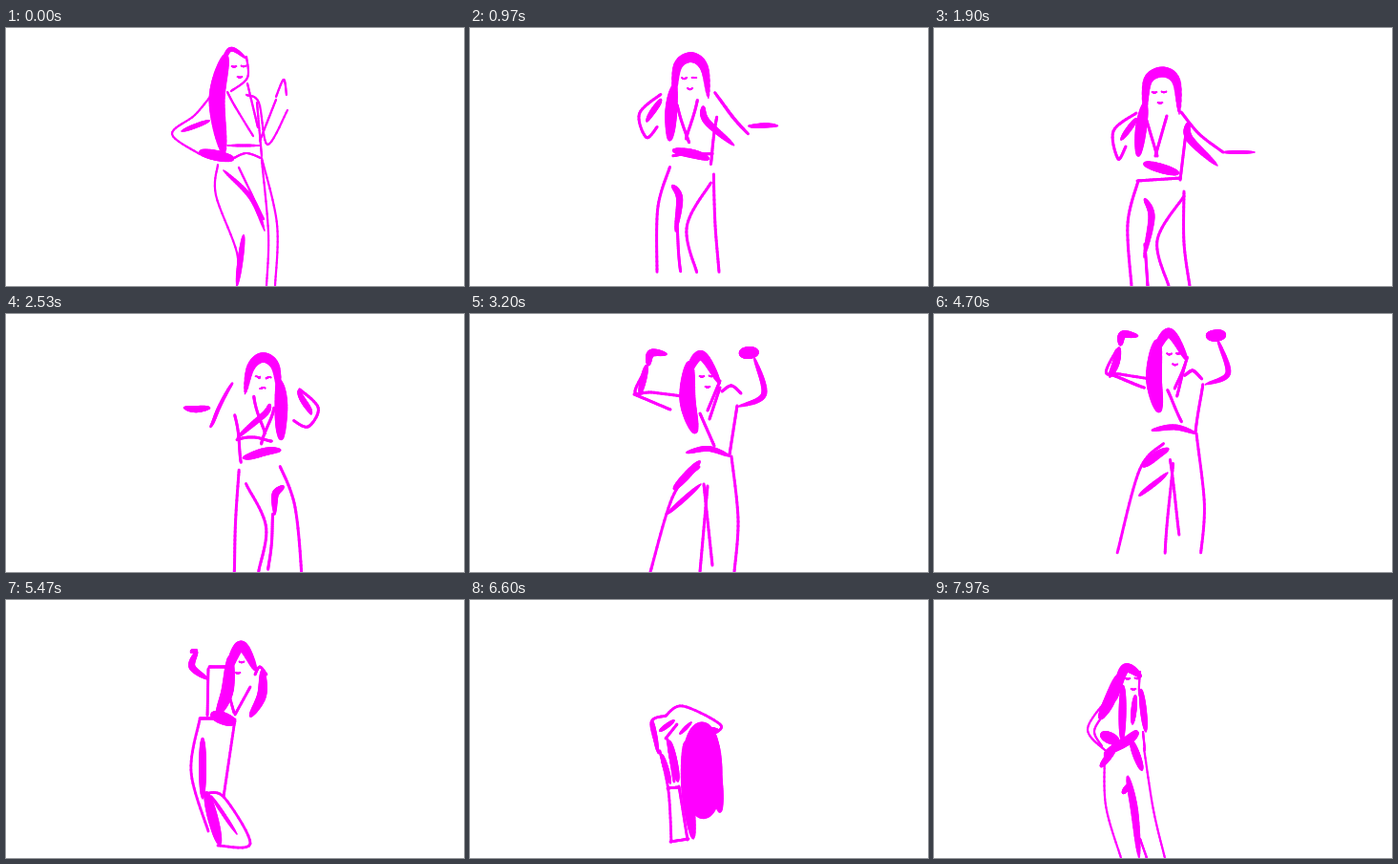
Recreate the animation shown at these times as an HTML page with a canvas. Size 480 by 270 pixels, loop 8000 ms.

```html
<!DOCTYPE html>
<html lang="en">
<head>
<meta charset="utf-8">
<title>Dancer</title>
<style>
  html, body { margin: 0; width: 100%; height: 100%; overflow: hidden; background: #fff; }
  canvas { display: block; width: 100vw; height: 100vh; }
</style>
</head>
<body>
<canvas id="stage" width="480" height="270"></canvas>
<script>
const LOOP = 8000, FPS = 30, SAMPLES = 28;

// A part is a brush stroke through a few x y points.
// An extra last number is the width of its belly; without it the line is even.
const hip = {
  line: 2.2, look: '243 40',
  crown: '222 55 234 23 252 32 5', lock: '230 30 221 75 228 131 17', cheek: '252 30 253 52 236 66',
  armL: '217 68 198 91 174 111 203 132', sleeve: '213 97 184 108 5', handL: '204 130 238 137 11',
  armR: '252 70 265 78 274 122 295 86', cuff: '283 75 266 118', handR: '283 72 291 54 294 70',
  lapelL: '232 67 240 82 259 113', lapelR: '253 58 264 104', side: '263 78 268 134',
  waist: '232 123 267 123 3', belt: '239 136 252 131 267 136',
  legL: '222 143 220 175 242 235 242 270', legM: '268 138 275 215 273 270', legR: '268 136 284 205 282 270',
  foldA: '228 149 257 178 271 212 5', foldB: '249 217 242 270 6', crease: '244 146 270 200'
};
const point = {
  line: 3, look: '235 67',
  crown: '221 88 224 55 240 46 254 56 257 90 11', lock: '221 80 217 105 214 134 12',
  armL: '212 89 188 108 193 137 201 124', sleeve: '212 95 196 117 6',
  armR: '259 88 278 111 303 130', cuff: '266 100 268 116 297 144 8', handR: '303 130 336 130 4',
  lapelL: '222 94 234 134', lapelR: '244 92 232 134', side: '264 110 258 159',
  waist: '221 142 256 152 10', belt: '213 160 258 157',
  legL: '214 160 203 205 207 270', legM: '262 176 234 222 246 270', legR: '262 171 262 225 268 270',
  foldA: '221 179 228 198 220 240 7', crease: '221 226 224 270'
};
const raise = {
  line: 3, look: '247 65',
  crown: '226 66 242 43 262 73 10', lock: '230 52 228 90 236 124 17', cheek: '262 70 249 101',
  armL: '184 58 173 82 190 82 222 86', sleeve: '185 54 178 84 7', handL: '187 53 190 41 206 42 8',
  armR: '298 46 308 84 281 97 6', handR: '285 41 300 40 13', cuff: '172 84 210 100',
  lapelL: '241 104 256 138', lapelR: '262 77 251 110', side: '280 96 272 147',
  waist: '227 145 250 141 273 149 6', belt: '264 81 274 75 284 83',
  legL: '240 160 213 190 189 270', legM: '249 180 241 270', legR: '274 149 281 215 277 270',
  foldA: '214 183 241 154 8', foldB: '207 209 242 178 5', crease: '245 178 254 263'
};
const stride = {
  line: 2.4, look: '231 27',
  crown: '214 35 232 7 247 24 10', lock: '217 22 204 60 179 102 15', cheek: '248 18 246 42 234 68',
  armL: '210 52 196 82 192 102', sleeve: '230 70 222 98 193 104 15', handL: '221 43 231 49 9',
  armR: '242 60 268 63', cuff: '244 70 268 68 5', handR: '265 58 286 62 6',
  lapelL: '226 55 238 78', lapelR: '222 40 233 22 239 69', side: '245 68 240 106',
  waist: '192 111 243 110 6', belt: '195 113 196 132 7',
  legL: '194 115 179 116 179 160 170 270', legM: '213 139 197 248 201 270', legR: '233 111 253 230 252 270',
  foldA: '219 136 217 180 239 226 13', foldB: '240 222 219 265 8', crease: '220 115 234 133'
};
const shimmy = {
  line: 2.8, look: '241 65',
  crown: '231 78 246 48 262 74 11', lock: '235 60 232 95 222 120 13',
  armL: '200 54 195 70 212 83 7', handL: '194 54 200 53 5', cuff: '213 70 230 70',
  armR: '269 74 268 100 256 122 10', handR: '261 78 266 70 273 78',
  lapelL: '232 93 239 118', lapelR: '256 91 240 120', side: '212 72 211 121',
  waist: '217 120 239 128 13', belt: '203 124 219 124',
  legL: '203 125 194 180 212 242', legM: '211 202 229 207 256 255 222 257', legR: '240 125 228 206',
  foldA: '206 145 206 208 8', foldB: '210 202 224 256 11', crease: '215 205 242 245 4'
};
const bow = {
  line: 2.8,
  crown: '226 150 228 200 234 250 13', lock: '243 136 243 180 245 223 43',
  armL: '206 121 190 128 198 160', sleeve: '191 126 197 160 5', handL: '199 137 214 126 5',
  armR: '205 121 223 111 262 130 256 140', handR: '246 135 260 136 5',
  lapelL: '205 145 217 130', lapelR: '220 140 232 128 4', side: '207 146 214 190',
  waist: '209 148 218 190 8', belt: '207 197 218 196',
  legL: '199 158 208 200 211 253', legM: '219 195 228 251', legR: '210 253 229 250',
  foldA: '201 162 210 192 6', foldB: '256 160 262 222 12'
};
const walk = {
  line: 2.2, look: '207 82',
  crown: '189 105 200 72 217 80 10', lock: '193 80 184 105 174 124 12', cheek: '216 75 215 96 219 110',
  armL: '183 102 161 135 180 158', sleeve: '179 118 168 137 176 153', handL: '177 141 192 148 12',
  armR: '217 94 222 138 7', cuff: '175 174 190 155 7',
  lapelL: '198 90 197 148 8', lapelR: '211 100 208 130 6', side: '219 138 221 157',
  waist: '180 160 203 147 213 138 10', belt: '207 148 218 178 8',
  legL: '179 160 180 215 196 270', legR: '220 155 230 220 242 270',
  foldA: '203 185 210 220 215 270 8', foldB: '205 193 198 202 6', crease: '216 250 223 270'
};

const at = (time, pose, dx = 0, dy = 0, mirrored = false) => ({ time, pose, dx, dy, mirrored });
const keys = [
  at(0, hip), at(430, hip, -6, -3), at(870, point, -8, -14), at(1270, raise, -8, -18),
  at(1900, point), at(2270, point, 48, 0, true), at(2850, raise, 24, 0, true), at(3200, raise),
  at(3600, hip, -12, -14), at(4030, stride), at(4400, stride, 14), at(4770, raise, 4, -22),
  at(5130, shimmy, 4, -6, true), at(5470, shimmy), at(5970, shimmy, -12), at(6600, bow),
  at(7130, walk, 8, -38), at(7970, walk)
];

const mix = (a, b, u) => a + (b - a) * u;
const spline = (a, b, c, d, u) =>
  b + u / 2 * (c - a + u * (2 * a - 5 * b + 4 * c - d + u * (3 * (b - c) + d - a)));

function brush(text, line) {
  const n = text.split(' ').map(Number);
  const belly = n.length % 2 ? n.pop() : 0;
  const last = n.length / 2 - 1;
  const coord = (i, axis) => n[2 * Math.max(0, Math.min(last, i)) + axis];
  return Array.from({ length: SAMPLES }, (_, s) => {
    const along = s / (SAMPLES - 1);
    const i = Math.min(last - 1, Math.floor(along * last));
    const [x, y] = [0, 1].map(axis =>
      spline(...[-1, 0, 1, 2].map(k => coord(i + k, axis)), along * last - i));
    const width = belly ? Math.max(1.6, belly * Math.sqrt(Math.sin(Math.PI * along))) : line;
    return { x, y, width };
  });
}

function addFeatures(pose) {
  if (!pose.look) return;
  const [x, y] = pose.look.split(' ').map(Number);
  const dash = (dx, dy) => `${x + dx - 2.5} ${y + dy} ${x + dx} ${y + dy + 0.7} ${x + dx + 2.5} ${y + dy} 2`;
  pose.eyeL = dash(-4, 0);
  pose.eyeR = dash(6, -0.5);
  pose.mouth = dash(2, 11);
  delete pose.look;
}

const poses = [...new Set(keys.map(key => key.pose))];
poses.forEach(addFeatures);
const names = [...new Set(poses.flatMap(Object.keys))].filter(name => name !== 'line');
for (const pose of poses) {
  for (const name of names) if (pose[name]) pose[name] = brush(pose[name], pose.line);
}

const ctx = document.getElementById('stage').getContext('2d');
const placeX = (key, x) => (key.mirrored ? 470 - x : x) + key.dx;

function drawPart(name, seed, from, to, u, frame) {
  const a = from.pose[name], b = to.pose[name];
  if (!(u < 0.5 ? a : b)) return;
  const wobble = 0.8 * Math.sin(Math.PI * u);
  let before;
  for (let s = 0; s < SAMPLES; s++) {
    const p = (a || b)[s], q = (b || a)[s];
    const phase = s / SAMPLES * 2 * Math.PI + seed * 3 + frame * 2.4;
    const x = mix(placeX(from, p.x), placeX(to, q.x), u) + wobble * Math.sin(phase);
    const y = mix(p.y + from.dy, q.y + to.dy, u) + wobble * Math.cos(phase);
    if (before) {
      ctx.lineWidth = mix(p.width, q.width, u);
      ctx.beginPath();
      ctx.moveTo(before.x, before.y);
      ctx.lineTo(x, y);
      ctx.stroke();
    }
    before = { x, y };
  }
}

function draw(now) {
  const frame = Math.floor(now % LOOP * FPS / 1000 + 0.01);
  const time = frame * 1000 / FPS;
  const next = Math.max(1, keys.findIndex(key => key.time > time));
  const from = keys[next - 1], to = keys[next];
  const linear = (time - from.time) / (to.time - from.time);
  const u = linear * linear * (3 - 2 * linear);
  ctx.fillStyle = '#fff';
  ctx.fillRect(0, 0, 480, 270);
  ctx.strokeStyle = '#f0f';
  ctx.lineCap = 'round';
  names.forEach((name, seed) => drawPart(name, seed, from, to, u, frame));
}

const start = performance.now();
function tick() {
  draw(Math.max(0, performance.now() - start));
  requestAnimationFrame(tick);
}
tick();
</script>
</body>
</html>
```
